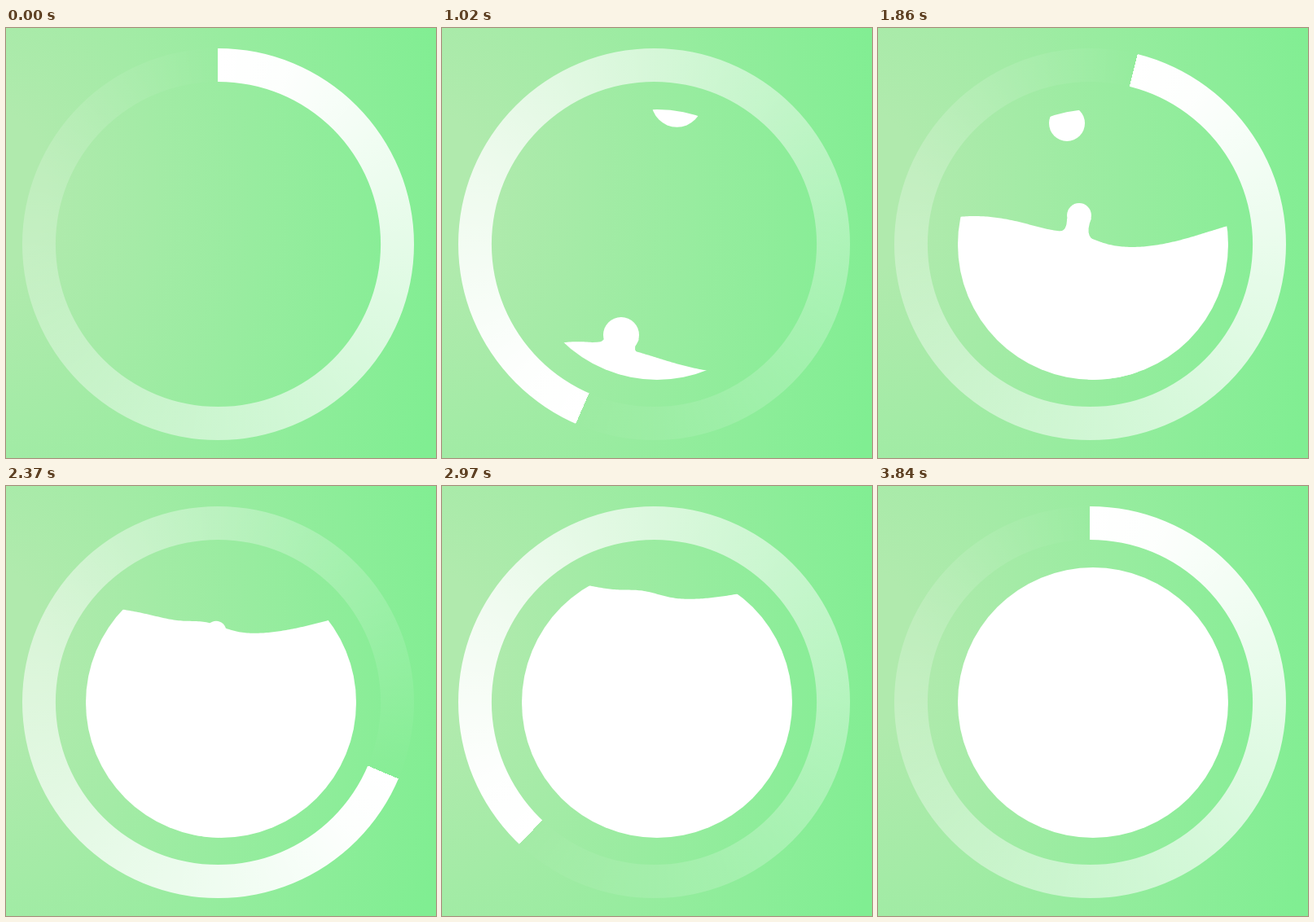
Write an HTML page with a canvas that moves like this. It is 528 px wide and 528 px high and loops after 3.87 s.

```html
<!DOCTYPE html>
<html lang="en">
<head>
<meta charset="utf-8">
<title>Filling loader</title>
<style>
html, body { margin: 0; width: 100%; height: 100%; overflow: hidden; background: #99ee9f; }
canvas { display: block; width: 528px; height: 528px; }
</style>
</head>
<body>
<canvas id="stage" width="528" height="528"></canvas>
<script>
const ctx = document.getElementById('stage').getContext('2d');
const LOOP = 3870, STEP = 30, TAU = Math.PI * 2;
const RING = { x: 260.5, y: 265.5, outer: 240.5, inner: 199.6 };
const BOWL = { x: 264, y: 266, r: 166 };
const FILL_START = 860, FALL_SPEED = .4, SMALL_DROP = .68;

// [time, head angle in degrees] and [time, mean liquid height]
const TURN = [[0, 0], [600, 123.7], [1410, 277.8], [1860, 374], [2370, 473], [2970, 583.5], [3840, 720]];
const LEVEL = [[FILL_START, 434], [1410, 331], [1860, 250], [2370, 165], [2970, 126.5], [3570, 88]];

// Each big drop follows a small one, offset by dx, dy
const PAIRS = [
  { t: 600, x: 220, y: 209, r: 22, dx: 28, dy: 81 },
  { t: 1410, x: 251, y: 157, r: 46, dx: 37.5, dy: 89.5 },
  { t: 1860, x: 232, y: 117, r: 22, dx: 15, dy: 113 },
  { t: 2200, x: 246, y: -120, r: 18, dx: 12, dy: 230 }
];

const clamp = v => Math.max(0, Math.min(1, v));
const mix = (a, b, k) => a + (b - a) * k;

function keyed(keys, t) {
  let i = 0;
  while (i < keys.length - 2 && t >= keys[i + 1][0]) i++;
  const [t0, a] = keys[i], [t1, b] = keys[i + 1];
  return mix(a, b, clamp((t - t0) / (t1 - t0)));
}

function circle(x, y, r) {
  ctx.beginPath();
  ctx.arc(x, y, r, 0, TAU);
}

function drawBackground() {
  const g = ctx.createRadialGradient(0, 0, 0, 0, 0, 580);
  g.addColorStop(.12, '#b0eaad');
  g.addColorStop(1, '#80ee92');
  ctx.save();
  ctx.translate(-20, 200);
  ctx.scale(1, 1.43);
  ctx.fillStyle = g;
  ctx.fillRect(0, -200, 600, 600);
  ctx.restore();
}

function drawRing(t) {
  const head = keyed(TURN, t) / 360 * TAU - TAU / 4;
  const g = ctx.createConicGradient(head, RING.x, RING.y);
  g.addColorStop(0, '#fff');
  g.addColorStop(.06, 'rgba(255,255,255,.98)');
  g.addColorStop(1, 'rgba(255,255,255,0)');
  ctx.fillStyle = g;
  circle(RING.x, RING.y, RING.outer);
  ctx.arc(RING.x, RING.y, RING.inner, 0, TAU, true);
  ctx.fill();
}

// A slowing swell, a hump left by the drops, and a droop at the left wall
function makeSurface(t) {
  const level = keyed(LEVEL, t);
  const crest = 105 + 60 * Math.exp(-Math.max(0, t - 1410) / 300);
  const swell = mix(19, 12, clamp((t - 1860) / 1200));
  const hump = swell / 2 * clamp((t - 1600) / 400);
  const droop = 60 * clamp((1860 - t) / 450);
  return x => level
    - swell * Math.cos(Math.PI * (x - crest) / 192)
    - hump * Math.exp(-(((x - 247) / 30) ** 2))
    + droop * Math.exp((98 - x) / 11);
}

function drawSurface(surface) {
  ctx.beginPath();
  ctx.moveTo(98, 440);
  for (let x = 98; x <= 430; x += 2) ctx.lineTo(x, surface(x));
  ctx.lineTo(430, 440);
  ctx.fill();
}

// Joins a sinking drop to the liquid
function drawNeck(surface, x, y, r) {
  const left = surface(x - 1.6 * r), right = surface(x + 1.9 * r);
  ctx.beginPath();
  ctx.moveTo(x - 1.6 * r, left);
  ctx.quadraticCurveTo(x - r, left, x - r, y + r / 4);
  ctx.lineTo(x + r, y + r / 4);
  ctx.quadraticCurveTo(x + r / 4, right - 2, x + 1.9 * r, right);
  ctx.lineTo(x, Math.max(left, right) + r);
  ctx.fill();
}

function drawDrop(surface, t, x, y, r) {
  circle(x, y, r);
  ctx.fill();
  const gap = surface(x) - y;
  if (t > FILL_START && gap > 0 && gap < 1.8 * r) drawNeck(surface, x, y, r);
}

function drawLiquid(t) {
  const surface = makeSurface(t);
  const growth = clamp((t - 400) / 200);
  ctx.save();
  circle(BOWL.x, BOWL.y, BOWL.r);
  ctx.clip();
  ctx.fillStyle = '#fff';
  if (t >= FILL_START) drawSurface(surface);
  for (const p of PAIRS) {
    const y = p.y + FALL_SPEED * (t - p.t), r = p.r * growth;
    drawDrop(surface, t, p.x, y, r);
    drawDrop(surface, t, p.x + p.dx, y + p.dy, r * SMALL_DROP);
  }
  ctx.restore();
}

function render(t) {
  drawBackground();
  drawRing(t);
  drawLiquid(t);
}

function tick() {
  const t = performance.now() % LOOP;
  render(Math.floor(t / STEP) * STEP);
  requestAnimationFrame(tick);
}
tick();
</script>
</body>
</html>
```
